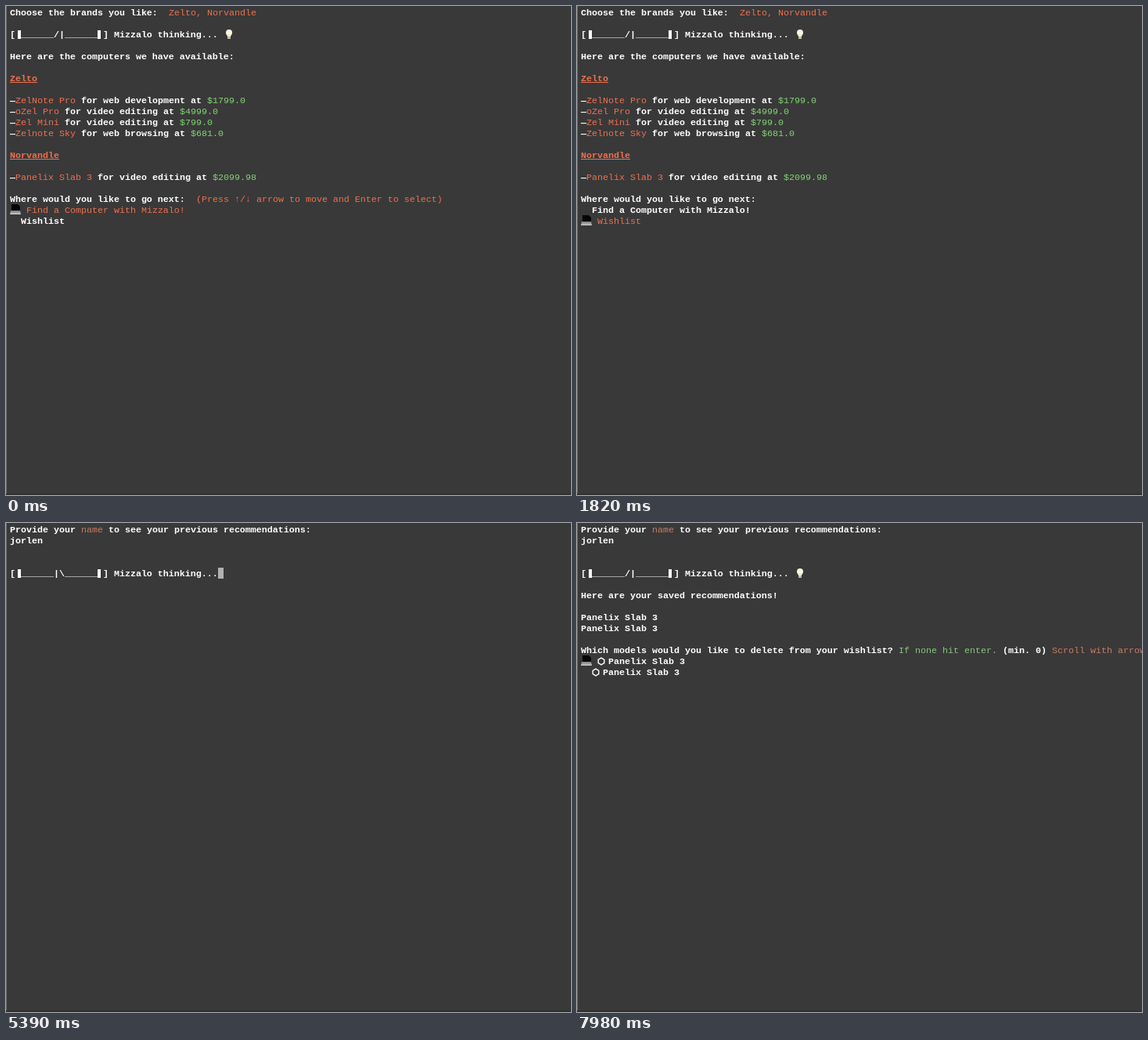
An HTML page with a canvas for the animation above (8000 ms loop, 722x624 px).

```html
<!DOCTYPE html>
<html lang="en">
<head>
<meta charset="utf-8">
<title>Terminal session</title>
<style>
  html, body { margin: 0; width: 100%; height: 100%; overflow: hidden; background: #393939; }
  canvas { display: block; }
</style>
</head>
<body>
<canvas id="stage" width="722" height="624"></canvas>
<script>
const ctx = document.getElementById("stage").getContext("2d");
const LOOP = 8000, STEP = 70;
const CELL = 7, LINE = 14, LEFT = 5;
const FONT = "11.667px 'Liberation Mono', 'DejaVu Sans Mono', monospace";
const WHITE = "#ffffff", ORANGE = "#ee704e", GREEN = "#80d672";
const DIM_ORANGE = "#c97c64", DIM_GREEN = "#86c87b";

const BOT = "Mizzalo", USER = "jorlen", MODEL = "Panelix Slab 3";
const BRANDS = ["Zelto", "Norvandle"];
const COMPUTERS = [
  [8, "ZelNote Pro", "web development", "1799.0"],
  [9, "oZel Pro", "video editing", "4999.0"],
  [10, "Zel Mini", "video editing", "799.0"],
  [11, "Zelnote Sky", "web browsing", "681.0"],
  [15, MODEL, "video editing", "2099.98"],
];

const SELECT_AT = 1330, CLEAR_AT = 1960, SPIN_AT = 4685, RESULT_AT = 6790;
const KEY_TIMES = [3290, 3500, 3570, 3780, 4130, 4200];
const SPIN_MS = 109, SPIN_WIDTH = 14, LAST_SPIN = 19;

const cellX = col => LEFT + col * CELL;
const rowY = row => row * LINE + 1;

function rect(x, y, w, h, color) {
  ctx.fillStyle = color;
  ctx.fillRect(x, y, w, h);
}

function polygon(points, color) {
  ctx.fillStyle = color;
  ctx.beginPath();
  points.forEach(([x, y]) => ctx.lineTo(x, y));
  ctx.fill();
}

function write(row, col, text, color, weight) {
  ctx.font = `${weight} ${FONT}`;
  ctx.fillStyle = color;
  ctx.fillText(text, cellX(col), rowY(row) + 11);
}

// Writes alternating colour, text pairs; white is the bold weight.
function put(row, col, ...parts) {
  for (let i = 0; i < parts.length; i += 2) {
    const [color, text] = [parts[i], parts[i + 1]];
    write(row, col, text, color, color === WHITE ? "bold" : "normal");
    col += text.length;
  }
}

function heading(row, text) {
  write(row, 0, text, ORANGE, "bold");
  rect(LEFT, rowY(row) + 12, text.length * CELL, 1, ORANGE);
}

function cursor(row, col) {
  rect(cellX(col), rowY(row), CELL, LINE, "#b1b1b1");
}

function laptop(row) {
  const y = rowY(row);
  polygon([[7, y], [15, y], [18, y + 3], [18, y + 8], [7, y + 8]], "#050505");
  const metal = ctx.createLinearGradient(0, y + 8, 0, y + 13);
  metal.addColorStop(0, "#777777");
  metal.addColorStop(1, "#cccccc");
  polygon([[6, y + 8], [18, y + 8], [19, y + 13], [5, y + 13]], metal);
}

function bulb(row) {
  const y = rowY(row);
  ctx.fillStyle = "#fbf8e6";
  ctx.beginPath();
  ctx.arc(285, y + 5, 4, 0, Math.PI * 2);
  ctx.fill();
  polygon([[282, y + 7], [288, y + 7], [287, y + 10], [283, y + 10]], "#f3edcf");
  rect(283, y + 10, 4, 3, "#bcbcb4");
}

function hexagon(row, col) {
  const x = cellX(col) + 5, y = rowY(row) + 7.5;
  ctx.strokeStyle = WHITE;
  ctx.lineWidth = 1.4;
  ctx.beginPath();
  for (let i = 0; i < 6; i++) {
    const angle = Math.PI * (i / 3 + 1 / 6);
    ctx.lineTo(x + 4.4 * Math.cos(angle), y + 4.4 * Math.sin(angle));
  }
  ctx.closePath();
  ctx.stroke();
}

// A fin crosses the bar to the right, then turns back.
function spinner(row, step) {
  const turn = SPIN_WIDTH - 1;
  const back = step >= turn;
  const before = back ? 2 * turn - 1 - step : step;
  const bar = "_".repeat(before) + (back ? "/|" : "|\\") + "_".repeat(SPIN_WIDTH - 2 - before);
  put(row, 0, WHITE, "[ " + bar + " ] " + BOT + " thinking...");
  rect(15, rowY(row) + 2, 4, 11, WHITE);
  rect(117, rowY(row) + 2, 4, 11, WHITE);
}

function menuScreen(t) {
  put(0, 0, WHITE, "Choose the brands you like:  ", ORANGE, BRANDS.join(", "));
  spinner(2, LAST_SPIN);
  bulb(2);
  put(4, 0, WHITE, "Here are the computers we have available:");
  heading(6, BRANDS[0]);
  heading(13, BRANDS[1]);
  for (const [row, model, use, price] of COMPUTERS)
    put(row, 0, WHITE, "—", ORANGE, model, WHITE, ` for ${use} at `, GREEN, "$" + price);

  const selected = t < SELECT_AT ? 0 : 1;
  put(17, 0, WHITE, "Where would you like to go next:");
  if (selected === 0) put(17, 34, ORANGE, "(Press ↑/↓ arrow to move and Enter to select)");
  [`Find a Computer with ${BOT}!`, "Wishlist"].forEach((label, i) => {
    const active = i === selected;
    put(18 + i, active ? 3 : 2, active ? ORANGE : WHITE, label);
    if (active) laptop(18 + i);
  });
}

function wishlistScreen(t) {
  put(0, 0, WHITE, "Provide your ", DIM_ORANGE, "name", WHITE, " to see your previous recommendations:");
  const typed = KEY_TIMES.filter(key => t >= key).length;
  put(1, 0, WHITE, USER.slice(0, typed));
  if (t < SPIN_AT) return cursor(1, typed);

  spinner(4, Math.min(LAST_SPIN, Math.floor((t - SPIN_AT) / SPIN_MS)));
  if (t < RESULT_AT) return cursor(4, 38);

  bulb(4);
  put(6, 0, WHITE, "Here are your saved recommendations!");
  put(8, 0, WHITE, MODEL);
  put(9, 0, WHITE, MODEL);
  put(11, 0, WHITE, "Which models would you like to delete from your wishlist? ",
    DIM_GREEN, "If none hit enter.", WHITE, " (min. 0) ", DIM_ORANGE, "Scroll with arrows");
  laptop(12);
  [3, 2].forEach((col, i) => {
    hexagon(12 + i, col);
    put(12 + i, col + 2, WHITE, MODEL);
  });
}

function draw() {
  const t = Math.floor(performance.now() % LOOP / STEP) * STEP;
  rect(0, 0, 722, 624, "#393939");
  rect(0, 0, 1, 624, "#707070");
  rect(0, 622, 722, 2, "#303030");
  (t < CLEAR_AT ? menuScreen : wishlistScreen)(t);
  requestAnimationFrame(draw);
}
draw();
</script>
</body>
</html>
```
